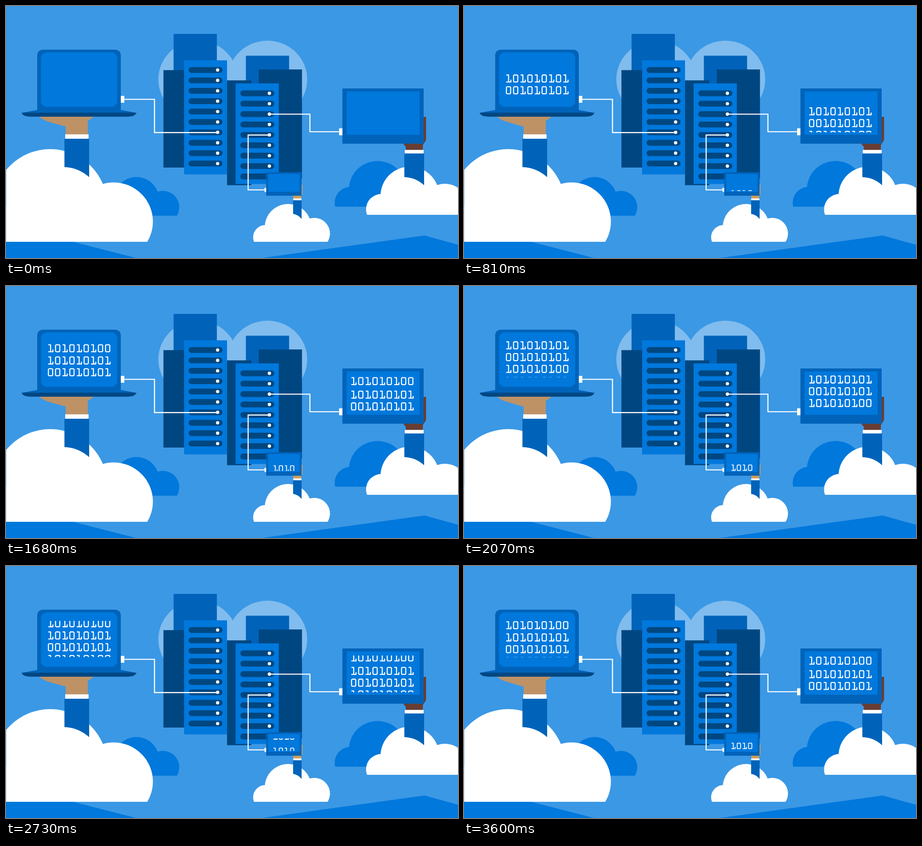
Recreate the animation shown at these times as an HTML page. Size 1000 by 560 pixels, loop 4.6 s.

```html
<!DOCTYPE html>
<html lang="en">
<head>
<meta charset="utf-8">
<title>Cloud servers</title>
<style>
  html, body { margin: 0; width: 100%; height: 100%; overflow: hidden; background: #3b98e5; }
  svg { display: block; width: 100%; height: 100%; }
  .blue { fill: #0078dc; }
  .mid { fill: #0063b9; }
  .dark { fill: #004781; }
  .white { fill: #fff; }
  .wire { fill: none; stroke: #fff; stroke-width: 2.4; }
  .digit { fill: none; stroke: #fff; stroke-width: 2.3; stroke-linejoin: round; }
</style>
</head>
<body>
<svg viewBox="0 0 1000 560" id="stage">
  <defs>
    <path id="d0" class="digit" d="M2.7 1.2H9.1L10.6 2.7V15.3L9.1 16.8H2.7L1.2 15.3V2.7Z"/>
    <path id="d1" class="digit" d="M1 1.2H6V16.8M.8 16.8H11.2V11.8"/>
    <clipPath id="cloudL"><rect x=".6" y="300" width="400" height="224"/></clipPath>
    <clipPath id="cloudBackL"><rect x="230" y="370" width="170" height="96"/></clipPath>
    <clipPath id="cloudBackR"><rect x="720" y="340" width="200" height="106"/></clipPath>
    <clipPath id="cloudR"><rect x="790" y="350" width="210" height="114"/></clipPath>
    <clipPath id="cloudS"><rect x="540" y="430" width="180" height="94"/></clipPath>
  </defs>

  <rect width="1000" height="560" fill="#3b98e5"/>
  <path class="blue" d="M0 524H148L288 560H0ZM566 560L926 510L1000 530.5V560Z"/>

  <!-- glow and towers -->
  <g fill="#80bcee">
    <ellipse cx="425" cy="163" rx="88" ry="86"/>
    <ellipse cx="578.4" cy="163" rx="88" ry="86"/>
  </g>
  <path class="mid" d="M370.7 62H466.5V150H370.7ZM530.7 110.5H626.3V180H530.7Z"/>
  <path class="dark" d="M348.3 142.6H400V359H348.3ZM489 165.2H542.8V398.3H489ZM559 141H654.8V383H559Z"/>
  <path class="blue" d="M394 120.8H489V374.2H394ZM508 172H603.6V395.6H508Z"/>
  <g id="slots"></g>

  <!-- clouds -->
  <g class="blue" clip-path="url(#cloudBackL)">
    <circle cx="288.5" cy="430" r="50"/><circle cx="347" cy="447" r="36.3"/>
    <rect x="250" y="430" width="100" height="40"/>
  </g>
  <g class="white" clip-path="url(#cloudL)">
    <circle cx="98" cy="444" r="126"/><circle cx="238" cy="479" r="87"/>
    <rect y="444" width="238" height="80"/>
  </g>
  <g class="blue" clip-path="url(#cloudBackR)">
    <circle cx="822" cy="408" r="63.5"/><circle cx="762.5" cy="437" r="35.3"/>
    <rect x="762" y="420" width="120" height="30"/>
  </g>
  <g class="white" clip-path="url(#cloudR)">
    <circle cx="893.5" cy="422" r="65"/><circle cx="831" cy="452" r="34.5"/>
    <circle cx="971" cy="445.3" r="50.3"/>
    <rect x="831" y="425" width="140" height="40"/>
  </g>
  <g class="white" clip-path="url(#cloudS)">
    <circle cx="624" cy="491.5" r="51.5"/><circle cx="574" cy="514" r="27.3"/>
    <circle cx="682" cy="505.5" r="34.8"/>
    <rect x="574" y="495" width="108" height="30"/>
  </g>

  <!-- wires -->
  <path class="wire" d="M258 207.4H328.5V281.3H468M583 240.4H672.4V279.4H741M583 286.8H535.7V408.6H575"/>
  <path class="white" d="M254 199.7H261.8V215H254ZM737 271.7H745V287.2H737ZM571.8 404H577V413.3H571.8Z"/>

  <!-- laptop on a hand -->
  <path fill="#be9265" d="M73 245H194.5Q189 250 181 255.5V287H132V268L92 256.5Q79 252 73 245Z"/>
  <path class="mid" d="M129.3 295H184V380.3Q160 359 129.3 358Z"/>
  <rect class="white" x="131" y="285.2" width="51.7" height="9.8"/>
  <path class="mid" d="M69 231V111Q69 97 83 97H240Q254 97 254 111V231L288.5 237.5H34.5Z"/>
  <path class="dark" d="M34.5 237H288.7Q286 245.8 268 246H56Q37 245.8 34.5 237Z"/>
  <rect class="blue" x="77.5" y="103" width="168.5" height="121.3" rx="13"/>

  <!-- tablet on a hand -->
  <path fill="#683d34" d="M922 247L929.3 246V298L922.3 309V321H884.5V313L877 304H922Z"/>
  <path class="mid" d="M881.3 327.5H925V398.3Q906 381 881.3 380.3Z"/>
  <rect class="white" x="882.3" y="319.8" width="41.7" height="7.8"/>
  <rect class="mid" x="744.3" y="183.2" width="179.7" height="122.8"/>
  <rect class="blue" x="753.5" y="190" width="161.5" height="96.3"/>

  <!-- phone on a hand -->
  <path fill="#d09e57" d="M652 397H655.7V418L653 423V428H636V424L632.5 420H652Z"/>
  <path class="mid" d="M635.2 431.3H654V473.3Q646 463.5 635.2 462Z"/>
  <rect class="white" x="635.4" y="427.6" width="18.2" height="4"/>
  <rect class="mid" x="575.7" y="369.2" width="78.2" height="52.4"/>
  <rect class="blue" x="580" y="373.2" width="69.7" height="39.8"/>
</svg>
<script>
  const stage = document.getElementById('stage');
  const LOOP = 4600, TICK = 30, LAST = 120, RISE = 2.59;
  const CODE = ['101010101', '001010101', '101010100'];

  function add(parent, tag, attrs) {
    const el = document.createElementNS('http://www.w3.org/2000/svg', tag);
    for (const key in attrs) el.setAttribute(key, attrs[key]);
    parent.append(el);
    return el;
  }

  function addSlots(x, y, count) {
    const slots = document.getElementById('slots');
    for (let i = 0; i < count; i++) {
      const cy = y + i * 23.1;
      add(slots, 'rect', { class: 'dark', x, y: cy - 6.5, width: 75, height: 13, rx: 6.5 });
      add(slots, 'circle', { class: 'white', cx: x + 64.2, cy, r: 3.7 });
    }
  }
  addSlots(404, 142.2, 10);
  addSlots(518.5, 194, 9);

  // start: top of the first row at tick 0; period: height of one block of rows
  const screens = [
    { x: 92.6, top: 122, bottom: 202.4, start: 222, period: 79.5, blocks: 4, lines: CODE, scale: 1 },
    { x: 763.2, top: 199, bottom: 281, start: 295, period: 82.4, blocks: 4, lines: CODE, scale: 1 },
    { x: 591, top: 383, bottom: 411, start: 479.4, period: 32, blocks: 9, lines: ['1010'], scale: 0.79 }
  ];

  screens.forEach((s, i) => {
    const clip = add(stage, 'clipPath', { id: 'screen' + i });
    add(clip, 'rect', { x: s.x - 4, y: s.top, width: 150, height: s.bottom - s.top });
    const view = add(stage, 'g', { 'clip-path': `url(#screen${i})`, role: 'img', 'aria-label': s.lines.join(' ') });
    s.rows = add(view, 'g', {});
    for (let b = 0; b < s.blocks; b++) {
      s.lines.forEach((line, r) => {
        const y = b * s.period + r * 26.2;
        const row = add(s.rows, 'g', { transform: `translate(0 ${y}) scale(${s.scale})` });
        [...line].forEach((c, n) => add(row, 'use', { href: '#d' + c, x: n * 15.8 }));
      });
    }
  });

  const begin = performance.now();
  function draw() {
    const time = (performance.now() - begin) % LOOP;
    const tick = Math.min(Math.floor(time / TICK), LAST);
    for (const s of screens) {
      s.rows.setAttribute('transform', `translate(${s.x} ${s.start - tick * RISE})`);
    }
    requestAnimationFrame(draw);
  }
  draw();
</script>
</body>
</html>
```
